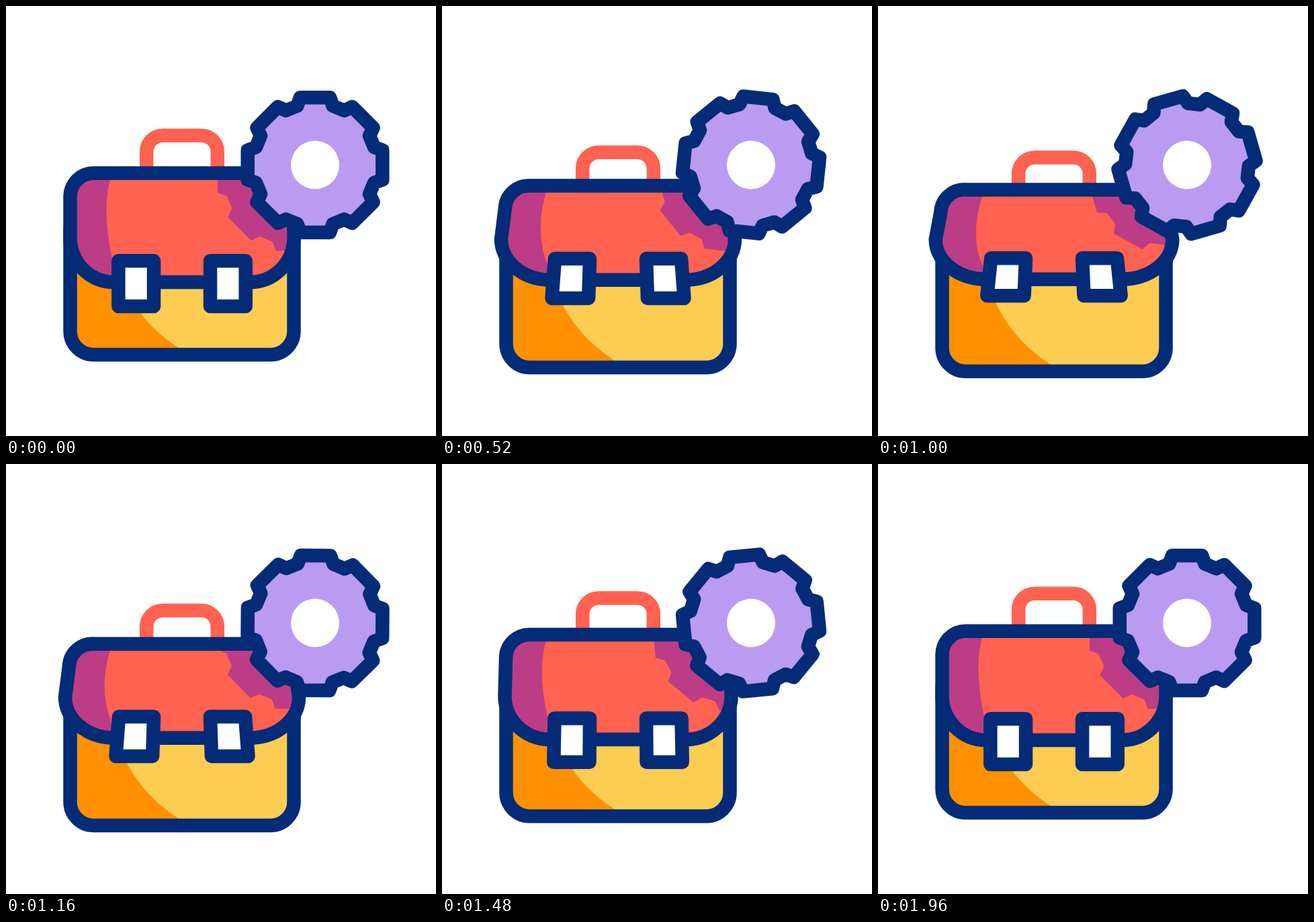
An HTML page that plays this animation: 640x640 px, repeating every 2000 ms.

```html
<!DOCTYPE html>
<html lang="en">
<head>
<meta charset="utf-8">
<title>Briefcase and gear</title>
<style>
  html, body { margin: 0; width: 100%; height: 100%; overflow: hidden; background: #fff; }
  svg { display: block; width: 100%; height: 100%; }
  .line { stroke: #032b77; stroke-width: 20.5; stroke-linejoin: round; }
</style>
</head>
<body>
<svg viewBox="0 0 640 640">
  <defs>
    <path id="flap"/>
    <path id="cog"/>
    <clipPath id="flapClip"><use href="#flap"/></clipPath>
  </defs>
  <rect id="handle" x="209.2" y="192.7" width="105.6" height="100" rx="24"
        fill="none" stroke="#ff6250" stroke-width="20.5"/>
  <g id="body">
    <rect x="95.5" y="300" width="333" height="219" rx="35" fill="#fdcc52"/>
    <path fill="#ff9100" d="M95.5 330V484a35 35 0 0 0 35 35H262V512Q197 472 170 405V330Z"/>
    <rect class="line" x="95.5" y="300" width="333" height="219" rx="35" fill="none"/>
  </g>
  <use href="#flap" fill="#ff6250"/>
  <g clip-path="url(#flapClip)" fill="#bc3d85">
    <path id="flapShade"/>
    <use id="gearShade" href="#cog"/>
  </g>
  <use href="#flap" class="line" fill="none"/>
  <path id="buckle" class="line" fill="#fff"/>
  <use href="#buckle" transform="translate(524) scale(-1 1)"/>
  <g id="gear">
    <use href="#cog" class="line" fill="#bb9af2"/>
    <circle r="36" fill="#fff"/>
  </g>
</svg>
<script>
  const LOOP = 2000;
  const WIDTH = 524; // sum of the x values of two mirrored points on the bag
  const el = id => document.getElementById(id);
  const setPath = (id, d) => el(id).setAttribute('d', d);
  const move = (id, value) => el(id).setAttribute('transform', value);

  function ease(t, from, to) {
    const u = Math.min(1, Math.max(0, (t - from) / (to - from)));
    return u * u * (3 - 2 * u);
  }

  // Eight teeth, each rising from the root radius to the tip radius.
  function cogPath(teeth = 8, tip = 102.7, root = 91.9) {
    const points = [];
    const add = (degrees, r) => {
      const a = degrees * Math.PI / 180;
      points.push(`${r * Math.sin(a)} ${-r * Math.cos(a)}`);
    };
    for (let i = 0; i < teeth; i++) {
      const mid = i * 360 / teeth;
      add(mid - 16.8, root);
      add(mid - 12.4, tip);
      add(mid + 12.4, tip);
      add(mid + 16.8, root);
    }
    return `M${points.join('L')}Z`;
  }

  // The sides lean out and the lower corners stretch as the flap is squashed.
  function flapPath(q) {
    const top = 248.8 + 27.2 * q, bottom = 411 - 4.8 * q;
    const shoulderX = 95.5 - 2.3 * q, shoulderY = top + 34.5 - 2 * q;
    const hipX = 95.5 - 10.8 * q, hipY = 345 + 3 * q;
    const shoulder = 'A35 35 0 0 1';
    const corner = `A${161 - hipX} ${bottom - hipY} 0 0 1`;
    return `M130.5 ${top}H${WIDTH - 130.5}${shoulder} ${WIDTH - shoulderX} ${shoulderY}` +
           `L${WIDTH - hipX} ${hipY}${corner} ${WIDTH - 161} ${bottom}` +
           `H161${corner} ${hipX} ${hipY}L${shoulderX} ${shoulderY}${shoulder} 130.5 ${top}Z`;
  }

  function bucklePath(q) {
    const top = 379.3 - 4.6 * q, bottom = 447 - 17.4 * q;
    return `M${167.3 + q} ${top}H220L${220 - 2.7 * q} ${bottom}H${167.3 - 5.5 * q}Z`;
  }

  function draw(t) {
    const squash = ease(t, 80, 780) - ease(t, 830, 1730);
    // Wind up, swing past a quarter turn, settle back.
    const spin = 7.8 * ease(t, 40, 740) - 110 * ease(t, 740, 1610) + 12.2 * ease(t, 1610, 1890);

    move('handle', `translate(0 ${36.3 * squash})`);
    move('body', `translate(0 ${27.4 * squash})`);
    setPath('flap', flapPath(squash));
    setPath('flapShade', `M60 220H156V${255 + 27 * squash}` +
      `Q${142 - 8 * squash} ${300 + 51 * squash} 158 ${376 + 17 * squash}V440H60Z`);
    setPath('buckle', bucklePath(squash));
    move('gear', `translate(460 236.6) rotate(${spin})`);
    move('gearShade', `translate(426 253.3) rotate(${spin}) scale(1.107)`);
  }

  setPath('cog', cogPath());
  const start = performance.now();
  function tick() {
    draw((performance.now() - start) % LOOP);
    requestAnimationFrame(tick);
  }
  tick();
</script>
</body>
</html>
```
